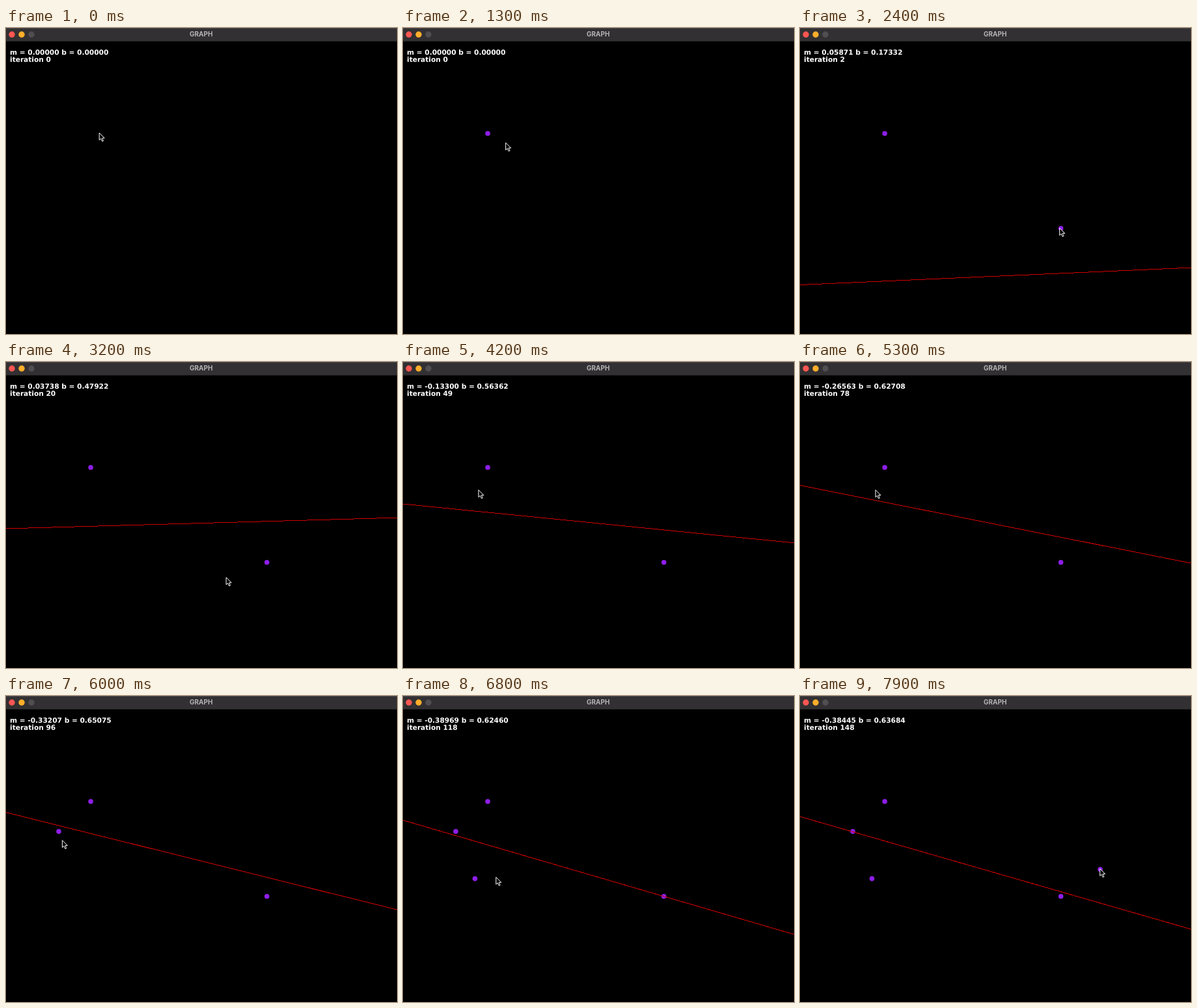
Write an HTML page that moves like this. It is 600x470 px and loops after 8 s.

```html
<!DOCTYPE html>
<html lang="en">
<head>
<meta charset="utf-8">
<title>Graph</title>
<style>
  html, body { margin: 0; width: 100%; height: 100%; overflow: hidden; background: #000; }
  svg { display: block; width: 600px; height: 470px; }
  .title { font: 700 10px Inter, sans-serif; fill: #b5b3b5; text-anchor: middle; }
  .info { font: 700 10.6px "DejaVu Sans", sans-serif; fill: #fff; text-rendering: geometricPrecision; }
  #dots { fill: #8e1ee8; }
  #fit { stroke: #d00000; stroke-width: 1; shape-rendering: crispEdges; }
  #cursor { fill: #000; stroke: #fff; stroke-width: 1; stroke-linejoin: round; }
</style>
</head>
<body>
<svg viewBox="0 0 600 470">
  <rect width="600" height="470"/>
  <rect width="600" height="20.5" fill="#323032"/>
  <rect width="600" height="1" fill="#474547"/>
  <circle cx="9" cy="10" r="4.7" fill="#fc5652"/>
  <circle cx="24" cy="10" r="4.7" fill="#fdae2a"/>
  <circle cx="39" cy="10" r="4.7" fill="#504e50"/>
  <text class="title" x="299.5" y="13.3">GRAPH</text>
  <g id="dots"></g>
  <line id="fit"/>
  <text class="info" id="params" x="6" y="40.5"></text>
  <text class="info" id="count" x="6" y="51.6"></text>
  <path id="cursor" d="M.5 .5V11.6L3 9.3L5 13.6L6.8 12.8L4.9 8.6H8.5Z"/>
</svg>
<script>
const LOOP = 8000, STEP = 100, RATE = 0.1, LAST = 148;
const W = 800, H = 600;  // sketch size, shown scaled down
const $ = id => document.getElementById(id);
const toScreen = (x, y) => [0.755 * x - 2.1, 0.755 * y + 20.1];
const mix = (a, b, u) => a + (b - a) * u;
const smooth = u => u * u * (3 - 2 * u);

// Pointer stops in sketch pixels; a click happens on leaving
const stops = [
  { arrive: 0, leave: 100, x: 193, y: 188 },
  { arrive: 600, leave: 850, x: 175, y: 188, click: true },
  { arrive: 850, leave: 1150, x: 175, y: 188 },
  { arrive: 1900, leave: 2320, x: 533, y: 381, click: true },
  { arrive: 3200, leave: 3200, x: 451, y: 413 },
  { arrive: 4200, leave: 5300, x: 157, y: 235 },
  { arrive: 5700, leave: 5770, x: 110, y: 249, click: true },
  { arrive: 6570, leave: 6590, x: 149, y: 345, click: true },
  { arrive: 7700, leave: 7850, x: 613, y: 326, click: true }
];

function pointerAt(t) {
  const k = stops.findLastIndex(s => s.arrive <= t);
  const a = stops[k], b = stops[k + 1];
  if (!b || t <= a.leave) return [a.x, a.y];
  const u = smooth((t - a.leave) / (b.arrive - a.leave));
  return [mix(a.x, b.x, u), mix(a.y, b.y, u)];
}

// Pace of the fitting: time, iterations done
const pace = [[2320, 0], [3200, 20], [4200, 49], [6000, 96], [7900, LAST]];

function iterationAt(t) {
  if (t <= pace[0][0]) return 0;
  const k = pace.findIndex(p => t <= p[0]);
  const [t0, i0] = pace[k - 1], [t1, i1] = pace[k];
  return Math.round(mix(i0, i1, (t - t0) / (t1 - t0)));
}

const points = stops.filter(s => s.click).map(s => {
  const dot = document.createElementNS("http://www.w3.org/2000/svg", "circle");
  const [cx, cy] = toScreen(s.x, s.y);
  dot.setAttribute("cx", cx);
  dot.setAttribute("cy", cy);
  dot.setAttribute("r", 3.8);
  $("dots").append(dot);
  return { dot, time: s.leave, after: iterationAt(s.leave), x: s.x / W, y: 1 - s.y / H };
});

// Stochastic gradient descent, one pass over the points per iteration
const fits = [[0, 0]];
for (let i = 1; i <= LAST; i++) {
  let [m, b] = fits[i - 1];
  for (const p of points.filter(p => p.after < i)) {
    const err = p.y - (m * p.x + b);
    m += RATE * err * p.x;
    b += RATE * err;
  }
  fits.push([m, b]);
}

function draw(now) {
  const t = Math.floor(now % LOOP / STEP) * STEP;
  const i = iterationAt(t), [m, b] = fits[i];
  for (const p of points) p.dot.style.display = t >= p.time ? "" : "none";

  const fit = $("fit");
  fit.style.display = i ? "" : "none";
  for (const end of [0, 1]) {
    const [x, y] = toScreen(end * W, H * (1 - m * end - b));
    fit.setAttribute("x" + (end + 1), x);
    fit.setAttribute("y" + (end + 1), y);
  }

  $("params").textContent = `m = ${m.toFixed(5)} b = ${b.toFixed(5)}`;
  $("count").textContent = `iteration ${i}`;
  const [px, py] = toScreen(...pointerAt(t));
  $("cursor").setAttribute("transform", `translate(${px - 1} ${py - 1.5})`);
}

const start = performance.now();
function tick() {
  draw(performance.now() - start);
  requestAnimationFrame(tick);
}
tick();
</script>
</body>
</html>
```
